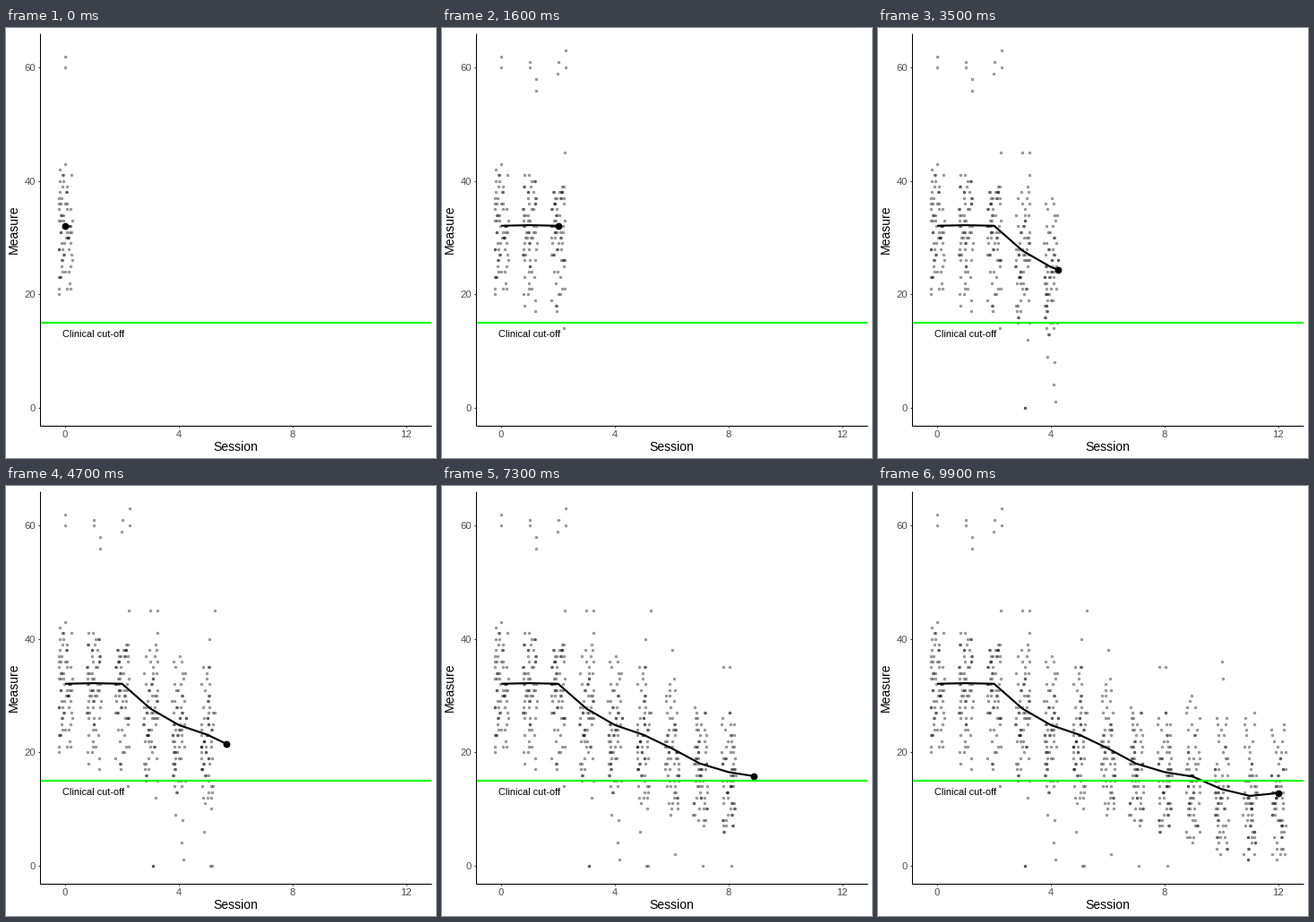
Write a matplotlib script that moves like this. It is 480 px wide and 480 px high and loops after 10 s.

```python
import numpy as np
import matplotlib.pyplot as plt
from matplotlib.animation import FuncAnimation

SIZE, DPI = 480, 72
FRAMES, INTERVAL = 100, 100
LEFT, RIGHT, TOP, BOTTOM = 38.4, 474.5, 5.5, 443.6
GREY_TEXT, GREY_TICK = "#4d4d4d", "#333333"

plt.rcParams["font.family"] = "Liberation Sans"
rng = np.random.default_rng(11)


def px(session):
    return LEFT + (np.asarray(session) + 0.875) * (RIGHT - LEFT) / 13.75


def py(measure):
    return BOTTOM - (np.asarray(measure) + 3.15) * (BOTTOM - TOP) / 69.3


# Mean and upper end of the bulk of scores in each session
MEANS = np.array([32.1, 32.2, 32.1, 27.7, 24.8, 23.1, 20.7,
                  18.0, 16.5, 15.7, 13.5, 12.3, 12.8])
HIGHS = [42, 41, 39, 39, 37, 36, 33, 28, 27, 30, 27, 27, 25]
SESSIONS = np.arange(len(MEANS))
LAST = SESSIONS[-1]

# Isolated scores: jittered session, measure
EXTREMES = np.array([
    (0, 62), (0, 60), (0, 43),
    (1, 61), (1, 60), (1.24, 58), (1.24, 56), (1.2, 17),
    (2, 61), (1.98, 59), (2.25, 63), (2.25, 60), (2.24, 45), (2.2, 14),
    (3, 45), (3.25, 45), (3.25, 41), (3.19, 12), (3.1, 0), (3.1, 0),
    (3.88, 9), (4.1, 4), (4.13, 8), (4.16, 1),
    (5.25, 45), (5.06, 40), (4.89, 6), (5.13, 10), (5.1, 0), (5.16, 0),
    (6.03, 38), (6.1, 2), (7.1, 0), (7.8, 35), (8.02, 35), (8.1, 0),
    (10.02, 36), (10.06, 33),
])


def session_points(k, n=66):
    """Jittered whole-number scores spread around the session mean."""
    low = max(20 - 1.8 * k, 1)
    spread = MEANS[k] + np.array([-6.5, -2.5, 0.5, 4.5])
    rank = (np.arange(n) + rng.random(n)) / n
    score = np.interp(rank, np.linspace(0, 1, 6), [low, *spread, HIGHS[k]])
    x, y = EXTREMES[np.round(EXTREMES[:, 0]) == k].T
    return (px(np.r_[k + rng.uniform(-0.25, 0.25, n), x]),
            py(np.r_[np.round(score), y]))


fig = plt.figure(figsize=(SIZE / DPI, SIZE / DPI), dpi=DPI, facecolor="white")
ax = fig.add_axes((0, 0, 1, 1))
ax.set_xlim(0, SIZE)
ax.set_ylim(SIZE, 0)
ax.axis("off")


def rule(x, y, color="black", width=1.07, z=4):
    ax.plot(x, y, color=color, lw=width, solid_capstyle="butt", zorder=z)


def label(x, y, text, size, color="black", ha="center", **kw):
    ax.text(x, y, text, size=size, color=color, ha=ha,
            **{"va": "baseline", **kw})


rule((LEFT, LEFT), (BOTTOM, TOP))
rule((LEFT, RIGHT), (BOTTOM, BOTTOM))
for s in range(0, 13, 4):
    rule((px(s), px(s)), (BOTTOM, BOTTOM + 2.75), GREY_TICK)
    label(px(s), 457.2, str(s), 11.2, GREY_TEXT)
for m in range(0, 61, 20):
    rule((LEFT - 2.75, LEFT), (py(m), py(m)), GREY_TICK)
    label(33.2, py(m) + 4, str(m), 11.2, GREY_TEXT, ha="right")
label((LEFT + RIGHT) / 2, 471.8, "Session", 14)
label(15.8, (TOP + BOTTOM) / 2, "Measure", 14, rotation=90,
      ha="right", va="center")
rule((LEFT, RIGHT), (py(15), py(15)), "#00ff00", 2.13, 3)
label(px(1), py(13) + 3.6, "Clinical cut-off", 11.04)

ink = (0, 0, 0, 0.35)
clouds = [ax.scatter(*session_points(k), s=2.7 ** 2, facecolor=[ink],
                     edgecolor=[ink], linewidth=0.7, zorder=1)
          for k in SESSIONS]
trend, = ax.plot([], [], color="black", lw=2.13, solid_capstyle="butt",
                 solid_joinstyle="round", zorder=2)
dot, = ax.plot([], [], "o", color="black", ms=7.8, mew=0, zorder=2.5)

# Sessions fall on whole frames; motion is linear in between
KEYS = np.round(SESSIONS * (FRAMES - 1) / LAST)


def update(i):
    now = np.interp(i, KEYS, SESSIONS)
    mean = np.interp(now, SESSIONS, MEANS)
    done = SESSIONS[:int(now) + 1]
    trend.set_data(px(np.r_[done, now]), py(np.r_[MEANS[done], mean]))
    dot.set_data([px(now)], [py(mean)])
    for key, cloud in zip(KEYS, clouds):
        cloud.set_visible(i >= key)
    return [trend, dot, *clouds]


anim = FuncAnimation(fig, update, frames=FRAMES, interval=INTERVAL,
                     init_func=lambda: update(0), repeat=True,
                     repeat_delay=0, blit=False)
plt.show()
```
